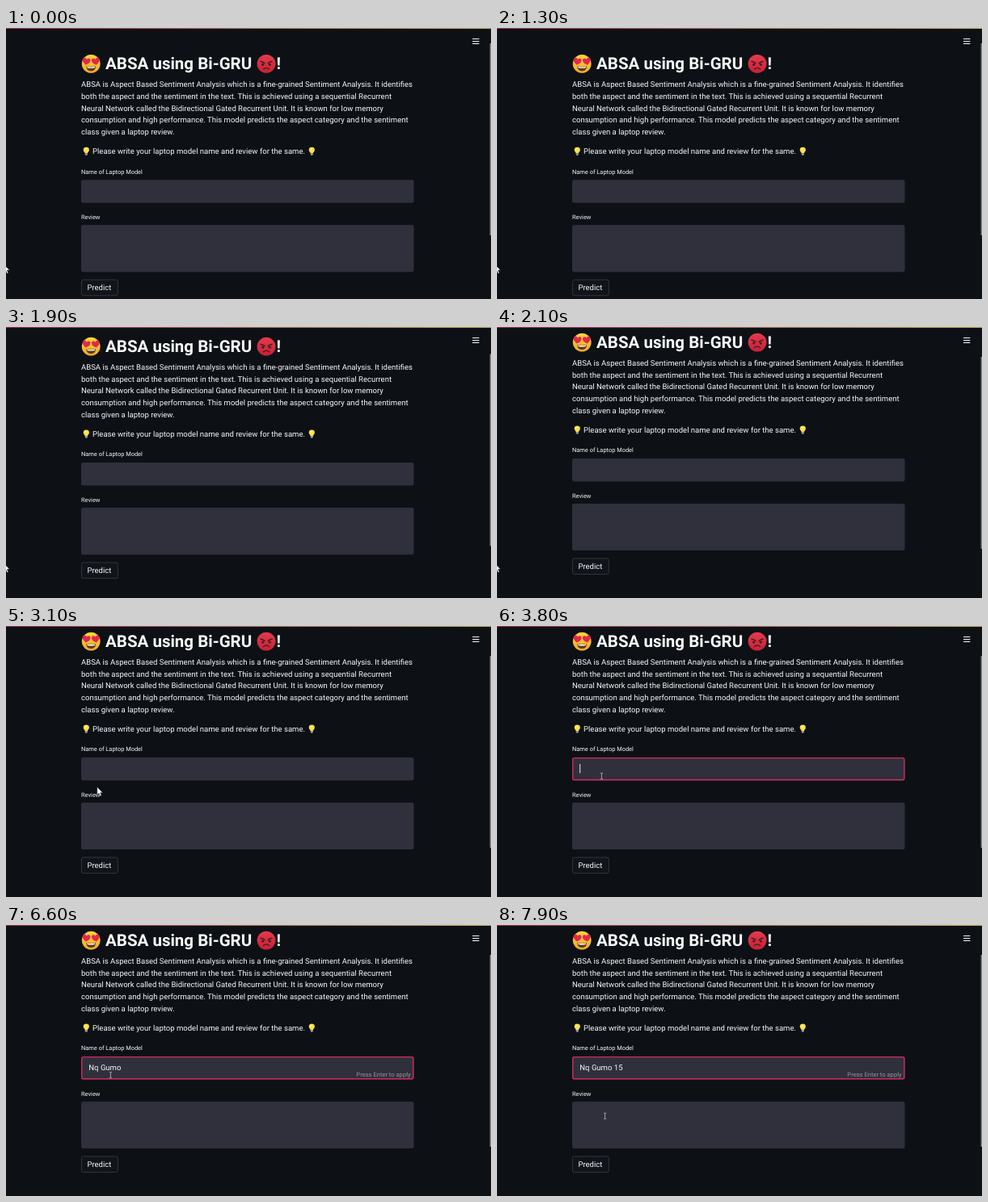
An HTML page for the animation above (8000 ms loop, 600 px wide and 336 px high).

```html
<!DOCTYPE html>
<html lang="en">
<head>
<meta charset="utf-8">
<title>ABSA using Bi-GRU</title>
<style>
  html, body { margin: 0; width: 100%; height: 100%; overflow: hidden; background: #0d1116; }
  svg { display: block; width: 600px; height: 336px; }
  text { font: 9.54px Roboto, "Open Sans", sans-serif; fill: #f6f6f7; text-rendering: geometricPrecision; white-space: pre; }
  .title { font-size: 20.5px; font-weight: 700; fill: #fafafa; }
  .label { font-size: 7.45px; }
  .hint { font-size: 7.6px; fill: #91929a; text-anchor: end; }
  .field { fill: #2f303b; }
  .button { fill: #11141b; stroke: #3c3e46; stroke-width: .8; }
</style>
</head>
<body>
<svg viewBox="0 0 600 336">
  <defs>
    <linearGradient id="bar">
      <stop offset="0" stop-color="#a52c52"/>
      <stop offset="1" stop-color="#c4ac5a"/>
    </linearGradient>
    <linearGradient id="yellow" x2="0" y2="1">
      <stop offset="0" stop-color="#fcd638"/>
      <stop offset="1" stop-color="#f3a928"/>
    </linearGradient>
    <linearGradient id="red" x2="0" y2="1">
      <stop offset="0" stop-color="#e53a4e"/>
      <stop offset="1" stop-color="#c82136"/>
    </linearGradient>
    <path id="heart" fill="#e2274f" d="M0 5C-3 3-5.3 1-5.3-1.5C-5.3-5-1.3-5.3 0-2.3C1.3-5.3 5.3-5 5.3-1.5C5.3 1 3 3 0 5Z"/>
    <g id="bulb">
      <path fill="#fde047" d="M-1.7 2.2C-1.8.8-3.6 0-3.6-1.8A3.6 3.4 0 0 1 3.6-1.8C3.6 0 1.8.8 1.7 2.2Z"/>
      <path fill="#fff6b0" d="M-2-2.2A2 2 0 0 1 0-4.1L.2-2.4Z"/>
      <path fill="#8f99a0" d="M-1.6 2.2H1.6V4L.7 5H-.7L-1.6 4Z"/>
    </g>
  </defs>

  <g id="page">
    <g transform="translate(105.2 44.4)">
      <circle r="11.4" fill="url(#yellow)"/>
      <path fill="#5f3a20" d="M-6 2.8Q0 4.4 6 2.8Q5.4 9 0 9Q-5.4 9-6 2.8Z"/>
      <path fill="#fff" d="M-5.2 3.3Q0 4.7 5.2 3.3L4.6 4.9Q0 5.9-4.6 4.9Z"/>
      <use href="#heart" transform="translate(-5.8 -3.2) rotate(10) scale(.93)"/>
      <use href="#heart" transform="translate(5.8 -3.2) rotate(-10) scale(.93)"/>
    </g>
    <text class="title" x="123" y="51.2">ABSA using Bi-GRU</text>
    <g transform="translate(322 44.4)">
      <circle r="11.4" fill="url(#red)"/>
      <g fill="none" stroke="#43211f" stroke-linecap="round" stroke-width="1.5">
        <path d="M-7-2.8Q-4.2-2.4-2-.6M7-2.8Q4.2-2.4 2-.6"/>
        <path d="M-3.6 6.4Q0 3.6 3.6 6.4"/>
      </g>
      <g fill="#43211f"><circle cx="-4.3" cy="1" r="1.6"/><circle cx="4.3" cy="1" r="1.6"/></g>
    </g>
    <text class="title" x="334.6" y="51.2">!</text>

    <g id="intro"></g>
    <use href="#bulb" x="99.3" y="153"/>
    <text x="107" y="156.3">Please write your laptop model name and review for the same.</text>
    <use href="#bulb" x="378.3" y="153"/>

    <text class="label" x="93" y="180.5">Name of Laptop Model</text>
    <rect class="field" x="93" y="188.2" width="411.5" height="28.6" rx="2.3"/>
    <rect id="focus" x="93.7" y="188.9" width="410.1" height="27.2" rx="2" fill="none" stroke="#d2295c" stroke-width="1.4"/>
    <text id="entry" x="102.3" y="205.6"></text>
    <rect id="caret" y="196.3" width=".9" height="11.4" fill="#fafafa"/>
    <text id="hint" class="hint" x="500.6" y="213">Press Enter to apply</text>

    <text class="label" x="93" y="237">Review</text>
    <rect class="field" x="93" y="244.2" width="411.5" height="58.2" rx="2.3"/>
    <rect class="button" x="93.4" y="312.2" width="45" height="19.6" rx="2.3"/>
    <text x="100.4" y="325.3">Predict</text>
  </g>

  <rect width="600" height="1" fill="url(#bar)"/>
  <path d="M577 13.5h8.4M577 16.5h8.4M577 19.5h8.4" stroke="#f4f4f5" stroke-width="1.2"/>
  <rect id="thumb" x="598.6" width="1.4" height="238" fill="#85868a"/>

  <path id="arrow" d="M0 0V10L2.3 7.9L3.9 11.4L5.5 10.7L4 7.3H7Z" fill="#fff" stroke="#111" stroke-width=".5"/>
  <path id="beam" d="M-1.6-3.6H-.5L0-3.2L.5-3.6H1.6M0-3.2V3.2M-1.6 3.6H-.5L0 3.2L.5 3.6H1.6" fill="none" stroke="#c4c4ca" stroke-width=".75"/>
</svg>

<script>
const LOOP = 8000, STEP = 100, BLINK = 500, FOCUS = 3400;
const MODEL = "Nq Gumo 15";
const KEYS = [4200, 4600, 4900, 5200, 5600, 5700, 5900, 6100, 6700, 7000];
const SCROLL = [[1500, 0], [1600, 3], [1700, 8], [1800, 15], [1900, 20.2], [2000, 23.8], [2100, 25.3]];
const INTRO = [
  "ABSA is Aspect Based Sentiment Analysis which is a fine-grained Sentiment Analysis. It identifies",
  "both the aspect and the sentiment in the text. This is achieved using a sequential Recurrent",
  "Neural Network called the Bidirectional Gated Recurrent Unit. It is known for low memory",
  "consumption and high performance. This model predicts the aspect category and the sentiment",
  "class given a laptop review."
];

const el = id => document.getElementById(id);
const show = (id, on) => el(id).style.visibility = on ? "visible" : "hidden";
const move = (id, x, y) => el(id).setAttribute("transform", `translate(${x} ${y})`);
const mix = (a, b, u) => a + (b - a) * u;
const progress = (t, from, to) => Math.min(1, Math.max(0, (t - from) / (to - from)));
const smooth = u => u * u * (3 - 2 * u);

function along(points, t) {
  const next = points.findIndex(p => p[0] > t);
  if (next === 0) return points[0][1];
  if (next < 0) return points[points.length - 1][1];
  const [a, b] = [points[next - 1], points[next]];
  return mix(a[1], b[1], progress(t, a[0], b[0]));
}

function drawPointer(t) {
  const enter = smooth(progress(t, 2400, 3300));
  const leave = smooth(progress(t, 7400, 7800));
  const x = mix(mix(-2.6, 129.4, enter), 133.6, leave);
  const y = mix(mix(293, 186, enter), 236.8, leave);
  const overField = x > 93 && (y > 163 && y < 192 || y > 219 && y < 277);
  show("beam", overField);
  show("arrow", !overField);
  move(overField ? "beam" : "arrow", x, y);
}

function drawEntry(t) {
  const typed = KEYS.filter(k => k <= t).length;
  const lastInput = typed ? KEYS[typed - 1] : FOCUS;
  const entry = el("entry");
  entry.textContent = MODEL.slice(0, typed);
  const width = typed ? entry.getComputedTextLength() : 0;
  el("caret").setAttribute("x", 102.3 + width);
  show("focus", t >= FOCUS);
  show("hint", typed > 0);
  show("caret", t >= FOCUS && Math.floor((t - lastInput) / BLINK) % 2 === 0);
}

function draw(now) {
  const t = Math.floor((now % LOOP) / STEP) * STEP;
  const scroll = along(SCROLL, t);
  move("page", 0, -scroll);
  el("thumb").setAttribute("y", 19 + scroll * .71);
  drawEntry(t);
  drawPointer(t);
}

el("intro").innerHTML = INTRO.map((line, i) => `<text x="93" y="${73.3 + i * 14.7}">${line}</text>`).join("");

let start;
function tick(now) {
  start ??= now;
  draw(now - start);
  requestAnimationFrame(tick);
}
draw(0);
requestAnimationFrame(tick);
</script>
</body>
</html>
```
